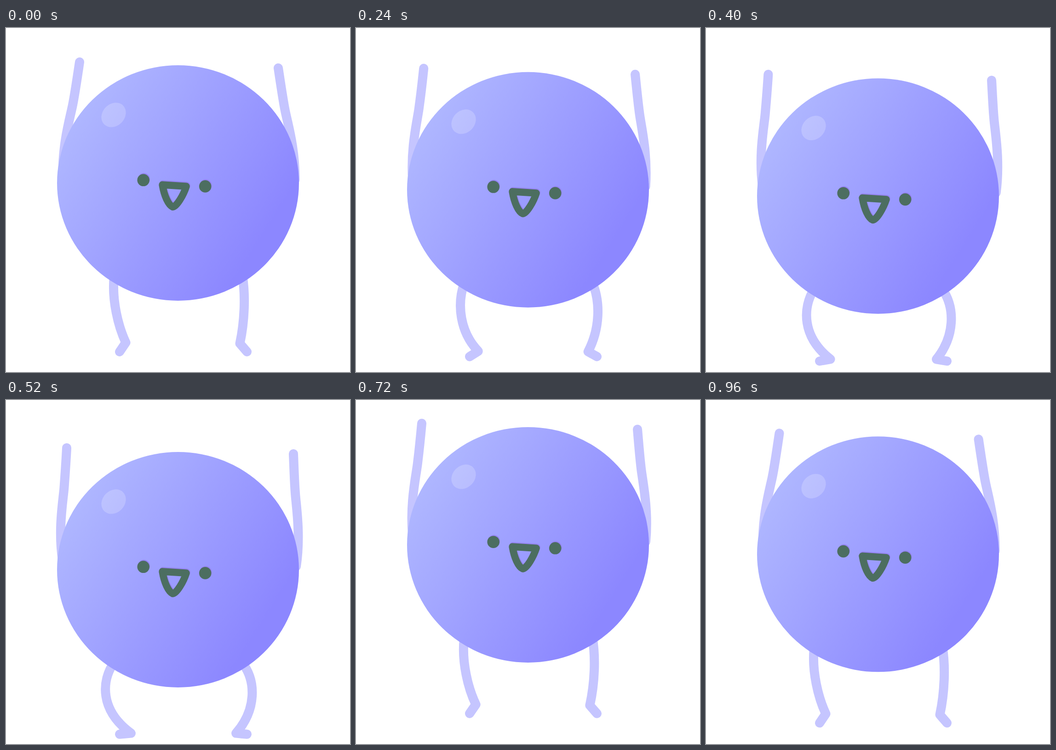
An HTML page for the animation above (1 s loop, 748x748 px).

```html
<!DOCTYPE html>
<html>
<head>
<meta charset="utf-8">
<style>
html, body { margin: 0; height: 100%; overflow: hidden; background: #fff; }
svg { display: block; width: 100vw; height: 100vh; }
.limb { fill: none; stroke: #c5c5ff; stroke-width: 20; stroke-linecap: round; stroke-linejoin: round; }
</style>
</head>
<body>
<svg viewBox="0 0 748 748">
  <defs>
    <linearGradient id="skin" gradientUnits="userSpaceOnUse" x1="150" y1="-147" x2="560" y2="113">
      <stop offset="0" stop-color="#afb7ff"/>
      <stop offset="1" stop-color="#8c87ff"/>
    </linearGradient>
    <g id="face">
      <circle cx="298.7" cy="-6.2" r="13.3" stroke="none"/>
      <circle cx="433.2" cy="7.4" r="13.3" stroke="none"/>
      <path d="M340 4L392 7.3C386 26 371 52 362.5 52C353 48 344 28 340 4Z"
        fill="none" stroke-width="15.5" stroke-linejoin="round"/>
    </g>
  </defs>
  <g id="figure">
    <path class="limb"/><path class="limb"/><path class="limb"/><path class="limb"/>
    <ellipse cx="374" cy="0" rx="263" ry="256" fill="url(#skin)"/>
    <ellipse rx="29" ry="24" transform="translate(234 -148) rotate(-45)" fill="#fff" fill-opacity=".2"/>
    <use href="#face" x="1" y="-2" fill="#9583f3" stroke="#9583f3"/>
    <use href="#face" fill="#4c6e60" stroke="#4c6e60"/>
  </g>
</svg>
<script>
const figure = document.getElementById('figure');
const limbs = document.querySelectorAll('.limb');

// Each limb: relaxed pose and crouched pose, relative to the body centre
const arms = [
  ['M160 -263C155.5 -233 150 -195 145 -170C139 -140 123.5 -90 123.5 -20',
   'M132 -265C130.5 -235 128.3 -205 126.5 -180C125 -155 112.5 -90 123 -20'],
  ['M592 -250C596.5 -220 602 -182 607 -157C613 -127 628.5 -77 628.5 -7',
   'M625 -252C626.3 -222 627 -192 629 -167C630.5 -142 641.5 -77 631 -7']
];
const legs = [
  ['M235 205C230 255 244 312 260.5 347L247 367',
   'M236 200C206 242 204 306 272 355.7L247 357.7'],
  ['M514 200C521 245 519 300 508.5 349L524 367',
   'M512 200C546 242 544 306 500 355.7L524 357.7']
];

const ease = (t, from, to) => {
  const x = Math.min(1, Math.max(0, (t - from) / (to - from)));
  return x * x * (3 - 2 * x);
};

function blend([a, b], k) {
  const end = b.match(/-?[\d.]+/g);
  let i = 0;
  return a.replace(/-?[\d.]+/g, n => +n + (end[i++] - n) * k);
}

function draw(now) {
  const t = Math.floor(now % 1000 / 40) * 40;
  const down = ease(t, 0, 510);
  const up = ease(t, 510, 735);
  const crouch = down - up;
  const swing = down - ease(t, 510, 1000);
  const jump = 22.8 * (up - ease(t, 735, 1005));

  figure.setAttribute('transform', `translate(0 ${337 + 32.3 * crouch - jump})`);
  arms.forEach((arm, i) => limbs[i].setAttribute('d', blend(arm, swing)));
  legs.forEach((leg, i) => limbs[i + 2].setAttribute('d', blend(leg, crouch)));
}

const start = performance.now();
function tick() {
  draw(performance.now() - start);
  requestAnimationFrame(tick);
}
tick();
</script>
</body>
</html>
```
